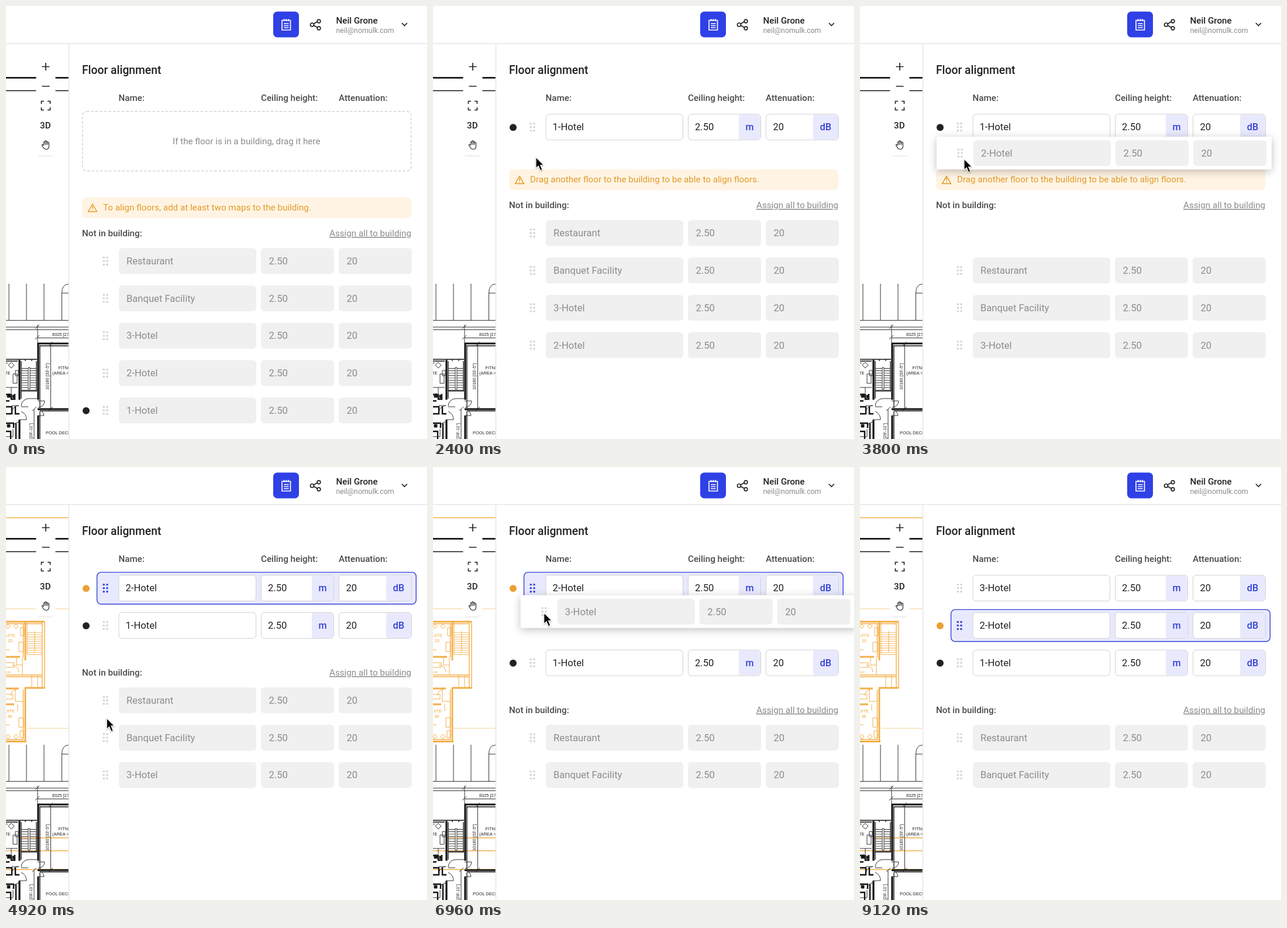
These frames come from a looping animation (720x739 px, 9160 ms). An HTML page:

```html
<!DOCTYPE html>
<html lang="en">
<head>
<meta charset="utf-8">
<title>Floor alignment</title>
<style>
html, body { margin: 0; height: 100%; overflow: hidden; background: #fff; }
svg { display: block; width: 100vw; height: 100vh; }
text { font: 15.2px Roboto, sans-serif; fill: #222; white-space: pre; }
.bold { font-weight: 500; }
.label { font-weight: 500; fill: #4a4a4a; }
.muted { fill: #8a8a8a; }
.plan { fill: none; stroke: #333; }
.plan text, .overlay text { font: 7.4px "Liberation Sans", Arial, sans-serif; stroke: none; }
.overlay { fill: none; stroke: #f3ae48; }
.overlay text { fill: #f0a63a; }
.line { fill: none; stroke: #222; stroke-width: 1.7; }
.hand { fill: #fff; stroke: #222; stroke-width: 1.5; stroke-linejoin: round; stroke-linecap: round; }
.row text { font-size: 16.6px; }
.row .unit { font-size: 16.2px; font-weight: 500; fill: #3340d4; text-anchor: middle; }
.off rect { fill: #f0f0f0; }
.off text { fill: #8c8c8c; }
.on rect { fill: #fff; stroke: #d2d2d2; }
.on .tint { fill: #e8e9fc; stroke: none; }
.grip { fill: #d3d3d3; }
.card { fill: #fff; filter: drop-shadow(0 3px 7px rgba(0, 0, 0, .25)); }
.ring { fill: #e8e9fc; stroke: #3441d6; stroke-width: 1.4; }
.card, .ring, .on, .in .off { display: none; }
.in .on, .drag .card, .selected .ring { display: inline; }
.selected .grip { fill: #2f3fe0; }
</style>
</head>
<body>
<svg viewBox="0 0 720 739">
  <defs>
    <g id="hand" class="hand">
      <path d="M5 13V6a1.6 1.6 0 0 1 3.2 0V3.500a1.6 1.6 0 0 1 3.2 0V5a1.6 1.6 0 0 1 3.2 0v2a1.6 1.6 0 0 1 3.2 0v7c0 5-2 8-6.300 8-4 0-6-2-7.800-5.500L1.500 13c-.8-1.800 1.500-2.800 2.700-1.200z"/>
      <path d="M8.200 6v5M11.400 5v6M14.600 7v4"/>
    </g>
  </defs>
  <rect width="720" height="739" fill="#fff"/>

  <g id="overlay" class="overlay">
    <path stroke-width="1.400" d="M0 86.500H107M22 633H107M0 655H107M0 687H107"/>
    <path opacity=".6" d="M0 242H107M36 446H107"/>
    <path stroke-width="2.800" d="M0 264H66M33 264V330M33 376V470M0 468.500H35M33 377H66M0 324H24M0 378H22M0 405H14"/>
    <path stroke-width="1.400" d="M62 264V378M66 264V378M0 267.500H62M29.500 268V325M29.500 380V465M0 465H30M0 355H62M0 358H62"/>
    <path d="M36 264V320H61M28 325V354M0 350H8M18 324V338H28M16 380V400H30M20 405V416M44 356V376M54 356V376M22 299h8v16h-8zM22 428h8v16h-8zM10 338a12 12 0 0 1 12 12M8 390a10 10 0 0 1 10-10M0 334h14v8h-14M0 388h12v8h-12M0 312h6M0 440h6M25 274h6v14h-6zM24 450h6v12h-6z"/>
    <path stroke-width="26" stroke-dasharray=".8 3" d="M49 282V319"/>
    <path d="M49 280V316M0 272l3-4 4 4-4 4zM13 272l4-4 4 4-4 4zM0 460l3-4 4 4-4 4zM13 460l4-4 4 4-4 4z"/>
    <text x="-1" y="290">UITE</text><text x="3" y="299">20</text>
    <text x="-2" y="419">UITE</text><text x="2" y="428">38</text>
  </g>

  <g class="plan">
    <path stroke="#000" stroke-width="2.600" d="M0 122.500H107"/>
    <path stroke="#111" stroke-width="1.600" d="M0 144.500H107"/>
    <path d="M5 474V536M35 474V536M65 474V536M95.500 536V490H107M95.500 490Q95.500 475 107 474.500M0 536.500H107M0 548H107M0 552.500H107M54 544V575M54 566.500H107M76.500 577V687M48 688V739M50 551l7-7M50 569l7-7M73 580l7-7M73 691l7-7M45 691l7-7"/>
    <path stroke="#111" stroke-width="3.200" d="M54 576H107M55 575V672M54 688H107M55 699V739M23 604V672M23 706V739"/>
    <path stroke="#111" stroke-width="1.300" d="M0 603H53M0 606H20M58 579V686M58 580H107M58 691H107M58 692V739M26 606V670M26 657H53M52 606V657M33 603V606M44 603V606"/>
    <path stroke-width="26" stroke-dasharray=".9 3.200" d="M39 618V657"/>
    <path fill="#fff" d="M38 617h3v37h-3zM4 613l5-5 5 5-5 5zM12 628h7v16h-7zM16 622h5v9h-5z"/>
    <path d="M26 683a13 13 0 0 1 13-13H53M26 684H38M54 674H66A11 11 0 0 1 55 685M54 699H65A11 11 0 0 0 55 689M23 706H35A14 14 0 0 0 26 692M10 682H22A12 12 0 0 0 10 694M0 651H20M9 651V661M12 720a10 10 0 0 1 10-10M0 735H12V722"/>
    <path stroke="#111" stroke-width="2.400" d="M0 663H9V671H15V662M0 674H6M0 684H10V696H0M16 683V696H23M0 712H13V720M0 726H8V739M17 712V739"/>
    <path fill="#111" d="M2 662h6v6H2zM11 664h4v5h-4zM2 714h5v5H2z"/>
    <text x="-2" y="613">P</text><text x="-2" y="628.500">TE</text>
    <text x="79" y="562.500">8325 [27'-4"]</text>
    <text x="89.500" y="619.500">FITNESS</text><text x="79" y="629">(AREA = 92)</text>
    <text x="68" y="731">POOL DECK</text>
    <text transform="translate(73 655) rotate(-90)">10180 [33'-5"]</text>
    <text transform="translate(45 712) rotate(-90)" text-anchor="end">8820 [28'-11"]</text>
  </g>

  <rect x="55" y="245" width="25" height="10" rx="3" fill="#fff" style="filter:drop-shadow(0 1px 1px #0002)"/>
  <rect x="51.500" y="88" width="33" height="165" fill="#fff"/>
  <path class="line" d="M61.500 103.500H74.500M68 97V110M61.500 137H74.500M60.500 167V162.500H65M71 162.500H75.500V167M75.500 173V177.500H71M65 177.500H60.500V173"/>
  <text class="bold" x="58" y="208.500">3D</text>
  <use href="#hand" transform="translate(60.500 228.500) scale(.73)"/>

  <rect x="107" y="64" width="613" height="675" fill="#fff"/>
  <path d="M107.500 65V739M0 64H720" stroke="#e6e6e6" stroke-width="1.500"/>
  <rect x="457" y="9.500" width="44" height="44" rx="7" fill="#2f40e6"/>
  <path fill="none" stroke="#fff" stroke-width="1.700" d="M472 24.500H486.500V41H472ZM475.500 22V26M479.300 22V26M483 22V26M475 30H483.500M475 33.500H483.500M475 37H483.500"/>
  <path class="line" d="M526 30.500L534 26M526 33L534 37.500M677 29l4.500 4.500 4.500-4.500"/>
  <g class="line" style="fill:#fff"><circle cx="523.500" cy="32" r="3"/><circle cx="535" cy="26" r="2.800"/><circle cx="535" cy="38" r="2.800"/></g>
  <text class="bold" x="564.500" y="29.500">Neil Grone</text>
  <text class="muted" x="564.500" y="46" style="font-size:12.4px">neil@nomulk.com</text>

  <text class="bold" x="130" y="115.500" style="font-size:19.3px">Floor alignment</text>
  <text class="label" x="192.500" y="161.700">Name:</text>
  <text class="label" x="436" y="161.700">Ceiling height:</text>
  <text class="label" x="569" y="161.700">Attenuation:</text>

  <g id="empty">
    <rect x="130.800" y="180" width="562" height="101.500" rx="7" fill="none" stroke="#d4d4d4" stroke-width="1.500" stroke-dasharray="4.500 3"/>
    <text class="muted" x="285" y="236">If the floor is in a building, drag it here</text>
  </g>
  <g id="section">
    <g id="warning">
      <rect x="130" y="-61.500" width="563.500" height="35.500" rx="7" fill="#fff4e3"/>
      <path d="M148 -50L155.500 -37H140.500ZM148 -46.500V-42M148 -40.500V-39" fill="none" stroke="#e59a22" stroke-width="1.500" stroke-linejoin="round"/>
      <text id="notice" x="166" y="-39" style="fill:#e39a2a"></text>
    </g>
    <text class="label" x="130" y="5">Not in building:</text>
    <text class="muted" x="553" y="5" text-decoration="underline">Assign all to building</text>
  </g>
  <g id="rows"></g>
  <path id="arrow" d="M0 0V19L4.300 15L7.700 23L11 21.500L7.800 13.500H13.500Z" fill="#000" stroke="#fff" stroke-width="1.200" style="filter:drop-shadow(0 1px 1px #0005)"/>
  <use id="grab" href="#hand"/>
</svg>
<script>
const LOOP = 9160, PITCH = 63.75, TOP = 184.7;
const names = ["Restaurant", "Banquet Facility", "3-Hotel", "2-Hotel", "1-Hotel"];
const notices = [
  "To align floors, add at least two maps to the building.",
  "Drag another floor to the building to be able to align floors."
];
const labelY = [388, 340.3, 351, 414.75];

// gx, gy: where the row is held; reach: how far above a slot it must be to push that slot down
const drags = [
  { start: 1000, end: 2080, gx: 167, gy: 13, reach: 20, alpha: .9 },
  { start: 3020, end: 4480, gx: 177, gy: 32, reach: 20, alpha: 1 },
  { start: 5440, end: 7740, gx: 170, gy: 24, reach: 95, alpha: 1 }
];
const path = [
  [200, 235, 765], [760, 167, 681], [1000, 167, 681], [1560, 194, 354], [1980, 170, 198],
  [2120, 170, 198], [2400, 176, 258], [2860, 177, 588], [3020, 177, 588], [3800, 178, 261],
  [4320, 177, 217], [4560, 177, 217], [5140, 170, 528], [5440, 170, 528], [6120, 200, 319],
  [6900, 190, 250], [7500, 180, 209], [8040, 180, 209], [8800, 250, 765]
];

const $ = id => document.getElementById(id);
const clamp = v => Math.max(0, Math.min(1, v));
const move = (el, x, y) => el.setAttribute("transform", `translate(${x} ${y})`);
const show = (el, on) => { el.style.display = on ? "" : "none"; };

const box = (x, w) => `<rect x="${x}" width="${w}" height="44" rx="5.500"/>`;
const write = (x, s, cls = "") => `<text class="${cls}" x="${x}" y="27.800">${s}</text>`;
const unit = (x, w, s) =>
  `<rect class="tint" x="${x}" y=".5" width="${w}" height="43" rx="4"/>${write(x + w / 2, s, "unit")}`;
const grip = [16, 22, 28].map(y => [167.3, 173].map(x =>
  `<circle cx="${x}" cy="${y}" r="1.800"/>`).join("")).join("");

$("rows").innerHTML = names.map((name, i) => `<g class="row">
  <rect class="card" x="130" y="-6" width="573" height="56" rx="3"/>
  <rect class="ring" x="155.600" y="-5.100" width="545.800" height="54.400" rx="7"/>
  <circle class="dot" cx="137" cy="22.500" r="6" fill="${i == 4 ? "#222" : "#eca036"}"/>
  <g class="grip">${grip}</g>
  <g class="off">${box(193, 235)}${box(436, 125)}${box(569, 125)}
    ${write(206, name)}${write(449.5, "2.50")}${write(582.5, "20")}</g>
  <g class="on">${box(193, 234.5)}${box(436.5, 124)}${box(569.5, 124)}
    ${unit(523, 37, "m")}${unit(650, 43, "dB")}
    ${write(204.5, name)}${write(448, "2.50")}${write(581.5, "20")}</g>
</g>`).join("");
const rows = [...$("rows").children];

function cursorAt(t) {
  if (t < path[0][0]) return path[0].slice(1);
  const n = path.findIndex(p => p[0] > t);
  if (n < 0) return path.at(-1).slice(1);
  const [a, b] = [path[n - 1], path[n]];
  const u = (t - a[0]) / (b[0] - a[0]), k = u * u * (3 - 2 * u);
  return [a[1] + (b[1] - a[1]) * k, a[2] + (b[2] - a[2]) * k];
}

function draw(t) {
  const phase = drags.filter(d => t >= d.end).length;
  const held = 4 - phase;
  const drag = drags.find(d => t >= d.start && t < d.end);
  const landing = drags.some(d => t >= d.end && t < d.end + 50);
  const [cx, cy] = cursorAt(t);
  const dragY = drag ? cy - drag.gy : Infinity;

  const push = slot => clamp((slot + 35 - dragY) / 25);
  const over = push(TOP + Math.max(0, phase - 1) * PITCH);
  const label = labelY[phase] + (phase ? over * PITCH : 0);

  show($("empty"), phase == 0);
  show($("overlay"), phase > 1);
  show($("warning"), phase < 2);
  $("notice").textContent = notices[phase] || "";
  move($("section"), 0, label);

  let overGrip = false;
  rows.forEach((row, i) => {
    const inside = i > held, dragged = drag && i == held;
    let x = 0, y;
    if (dragged) {
      x = cx - drag.gx;
      y = dragY;
    } else if (inside) {
      y = TOP + (i - held - 1) * PITCH;
      y += push(y) * PITCH;
    } else {
      y = label + 25.2 + i * PITCH;
      if (drag) y += clamp((y - drag.reach - dragY) / 25) * (1 - over) * PITCH;
    }
    const selected = i == 3 && phase > 1;
    row.classList.toggle("in", inside);
    row.classList.toggle("drag", !!dragged);
    row.classList.toggle("selected", selected);
    row.style.opacity = dragged ? drag.alpha : 1;
    show(row, !(landing && i == held + 1));
    show(row.querySelector(".dot"), i == 4 || selected);
    move(row, x, y);
    overGrip ||= Math.abs(cx - 170) < 12 && Math.abs(cy - y - 22) < 13;
  });
  $("rows").append(rows[held]);

  const hand = overGrip && !drag;
  show($("grab"), hand);
  show($("arrow"), !hand);
  move($("grab"), cx - 10, cy - 5);
  move($("arrow"), cx, cy);
}

function tick() {
  draw(performance.now() % LOOP);
  requestAnimationFrame(tick);
}
tick();
</script>
</body>
</html>
```
